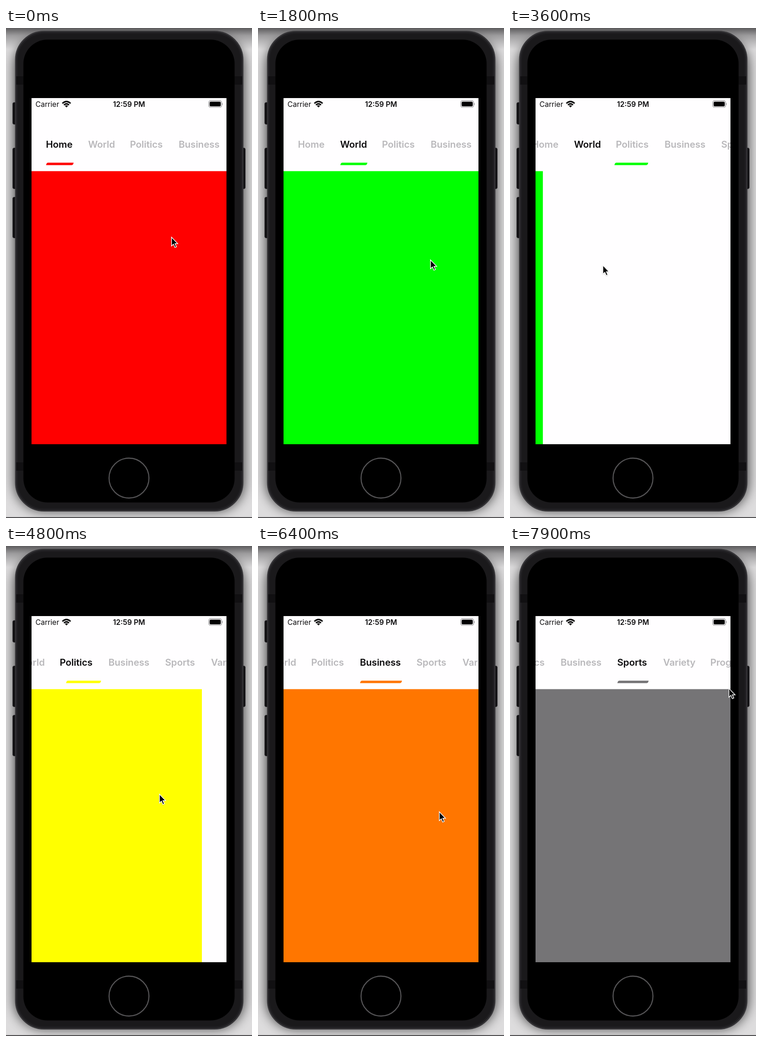
These frames come from a looping animation (530 by 1056 pixels, 8000 ms). An HTML page:

```html
<!DOCTYPE html>
<html lang="en">
<head>
<meta charset="utf-8">
<title>Swipeable tabs</title>
<style>
  html, body { margin: 0; width: 100%; height: 100%; overflow: hidden; background: #dddcdd; }
  svg { display: block; width: 530px; height: 1056px; }
  text { font-family: Inter, "Noto Sans", sans-serif; }
  .tab { font-size: 20.3px; font-weight: 600; letter-spacing: -.1px; fill: #b9b8bb; }
  .tab.on { fill: #0c0b0d; }
  .status { font-size: 15.6px; fill: #0c0b0d; }
</style>
</head>
<body>
<svg viewBox="0 0 530 1056">
  <defs>
    <filter id="soft" x="-20%" y="-20%" width="140%" height="140%"><feGaussianBlur stdDeviation="13"/></filter>
    <filter id="dim" x="-50%" y="-50%" width="200%" height="200%"><feGaussianBlur stdDeviation="1.2"/></filter>
    <linearGradient id="topShade" x2="0" y2="1">
      <stop offset="0" stop-color="#3c3b3d" stop-opacity=".8"/>
      <stop offset=".35" stop-color="#3c3b3d" stop-opacity=".4"/>
      <stop offset="1" stop-color="#3c3b3d" stop-opacity="0"/>
    </linearGradient>
    <clipPath id="screen"><rect x="55" y="151" width="420" height="746"/></clipPath>
  </defs>

  <rect width="530" height="1056" fill="#dddcdd"/>
  <rect x="18" y="20" width="495" height="1020" rx="62" fill="#000" opacity=".72" filter="url(#soft)"/>
  <rect width="530" height="46" fill="url(#topShade)"/>
  <rect y="1054" width="530" height="2" fill="#4b4a4c"/>

  <g fill="#131214" stroke="#2b2a2d">
    <rect x="14.5" y="160.5" width="10" height="47" rx="3"/>
    <rect x="14.5" y="258.5" width="10" height="88" rx="3"/>
    <rect x="14.5" y="364.5" width="10" height="88" rx="3"/>
    <rect x="506.500" y="258.500" width="9" height="88" rx="3"/>
  </g>
  <rect x="21" y="7.500" width="489" height="1033" rx="61" fill="#1a191b" stroke="#343336" stroke-width="3"/>
  <rect x="24" y="11" width="483" height="1026" rx="58" fill="none" stroke="#201f22" stroke-width="3"/>
  <g fill="#111012">
    <rect x="22" y="104" width="16" height="18"/><rect x="492" y="104" width="17" height="18"/>
    <rect x="22" y="936" width="16" height="18"/><rect x="492" y="936" width="17" height="18"/>
  </g>
  <rect x="37.500" y="25" width="455" height="997.500" rx="52"/>
  <circle cx="265" cy="970" r="43" fill="none" stroke="#555456" stroke-width="2.300"/>

  <g clip-path="url(#screen)">
    <rect x="55" y="151" width="420" height="746" fill="#fffeff"/>
    <text class="status" x="63.500" y="170">Carrier</text>
    <text class="status" x="265" y="170" text-anchor="middle" font-weight="600">12:59 PM</text>
    <g fill="none" stroke="#000" stroke-width="3">
      <path d="M121.500 162.500Q130.300 154.300 139.100 162.500M124.800 166Q130.300 160.800 135.800 166"/>
      <path d="M127 167.800Q130.300 165.300 133.600 167.800L130.300 171.300Z" fill="#000" stroke="none"/>
    </g>
    <rect x="436.700" y="156.700" width="28" height="14.300" rx="4" fill="none" stroke="#8f8e91" stroke-width="1.200"/>
    <rect x="438.700" y="158.700" width="24" height="10.300" rx="2.300"/>
    <path d="M466 161.500Q468.300 163.800 466 166.200Z" fill="#8f8e91"/>
    <g id="strip"><path id="bar"/></g>
    <rect id="page" x="55" y="308.500" width="420" height="589"/>
  </g>

  <g id="cursor">
    <path d="M0 1V21L4.600 17 7.600 24 11.500 22.500 8.500 15.500H14Z" opacity=".35" filter="url(#dim)"/>
    <path d="M.6 .8V19.800L4.900 15.900 7.900 23 11.200 21.600 8.200 14.700H13.900Z" stroke="#fff" stroke-width="1.500"/>
  </g>
</svg>
<script>
const LOOP = 8000, STEP = 100, PAGE = 420, SETTLE = 650;
const colors = ['#f00', '#0f0', '#ff0', '#ff7600', '#757476'];
// label, left edge, width
const tabs = [
  ['Home', 87, 58], ['World', 178, 57], ['Politics', 268, 72], ['Business', 373, 89],
  ['Sports', 495, 66], ['Variety', 594, 69], ['Program', 695.5, 84]
];
// start, release, pointer x where the page begins to follow
const swipes = [[100, 700, 342], [2400, 3200, 350], [4500, 5100, 383], [6700, 7200, 370]];
// time, x, y
const pointer = [
  [0, 356, 450], [700, 190, 462], [1000, 185, 463], [1800, 371, 499], [1900, 371, 499],
  [2100, 364, 500], [2300, 364, 500], [3100, 187, 500], [3200, 170, 501], [3500, 160, 505],
  [4100, 397, 538], [4300, 396, 537], [4400, 396, 537], [4800, 330, 534], [5100, 200, 545],
  [5300, 194, 547], [5600, 194, 547], [6200, 431, 571], [6400, 390, 572], [6600, 390, 572],
  [7100, 251, 579], [7200, 205, 582], [7400, 188, 582], [7900, 471, 306]
];

const $ = id => document.getElementById(id);
const strip = $('strip'), bar = $('bar'), page = $('page'), cursor = $('cursor');
const mix = (a, b, p) => a + (b - a) * p;
const clamp = p => Math.min(1, Math.max(0, p));
const ease = p => p * p * (3 - 2 * p);

const labels = tabs.map(([name, x]) => {
  const el = document.createElementNS('http://www.w3.org/2000/svg', 'text');
  el.textContent = name;
  el.setAttribute('x', x - 1);
  el.setAttribute('y', 258);
  strip.append(el);
  return el;
});

function pointerAt(t) {
  const i = pointer.findIndex(k => k[0] > t);
  if (i < 0) return pointer.at(-1).slice(1);
  const [a, b] = [pointer[i - 1], pointer[i]];
  const p = (t - a[0]) / (b[0] - a[0]);
  return [mix(a[1], b[1], p), mix(a[2], b[2], p)];
}

// Follows the pointer, then glides to the next page.
function pageShift(t, [, release, grab]) {
  const drag = Math.max(0, grab - pointerAt(Math.min(t, release))[0]);
  return t <= release ? drag : PAGE - (PAGE - drag) * Math.exp((release - t) / 147);
}

// Centres a tab on screen.
const scrollFor = i => Math.max(0, tabs[i][1] + tabs[i][2] / 2 - 265);

function draw(t) {
  const [cx, cy] = pointerAt(t);
  cursor.setAttribute('transform', `translate(${cx} ${cy})`);

  const current = swipes.filter(s => t >= s[1] + SETTLE).length;
  const swipe = swipes[current];
  const active = swipe && t >= swipe[0];
  const shift = active ? pageShift(t, swipe) : 0;
  const next = active ? current + 1 : current;
  const turn = active ? ease(clamp((t - swipe[0]) / 320)) : 0;

  page.setAttribute('x', 55 - shift);
  page.setAttribute('fill', colors[current]);
  strip.setAttribute('transform', `translate(${-mix(scrollFor(current), scrollFor(next), turn)} 0)`);
  labels.forEach((el, i) => el.setAttribute('class', i === current ? 'tab on' : 'tab'));

  const p = shift / PAGE;
  const left = mix(tabs[current][1], tabs[next][1], p) - .7;
  const right = left + mix(tabs[current][2], tabs[next][2], p) + 1.4;
  bar.setAttribute('d', `M${left} 295.500Q${left + 1} 290.200 ${left + 4.5} 290.200H${right}Q${right - 1} 295.500 ${right - 4.5} 295.500Z`);
  bar.setAttribute('fill', colors[current]);
}

const start = performance.now();
function frame() {
  const t = (performance.now() - start) % LOOP;
  draw(Math.floor(t / STEP) * STEP);
  requestAnimationFrame(frame);
}
frame();
</script>
</body>
</html>
```
